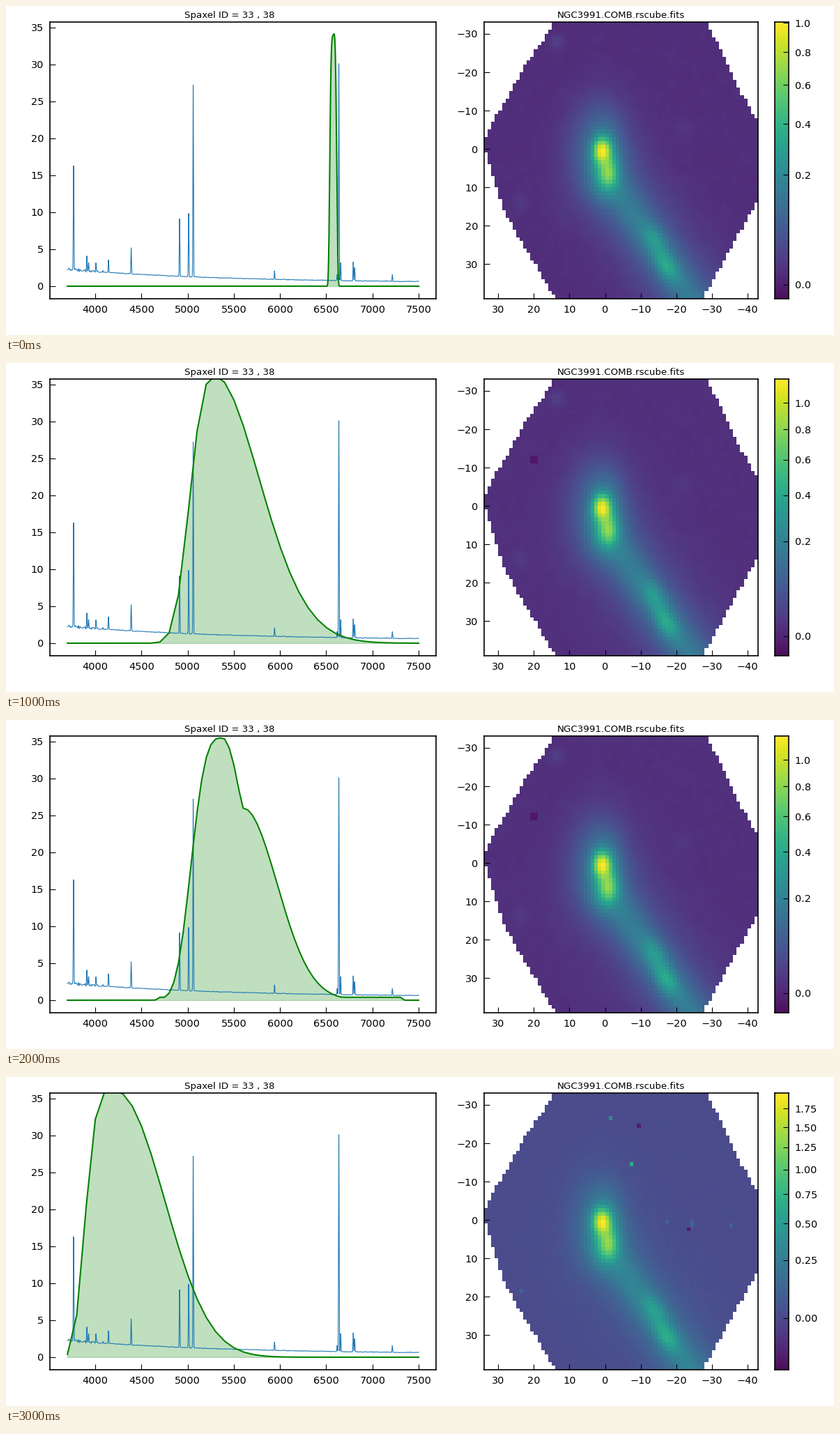
Write a matplotlib script that moves like this. It is 1188x472 px and loops after 3.5 s.

```python
import numpy as np
import matplotlib.pyplot as plt
from matplotlib.animation import FuncAnimation

W, H, DPI = 1188, 472, 80
plt.rcParams.update({
    "font.family": "DejaVu Sans",
    "axes.linewidth": 1.5,
    "xtick.direction": "in", "ytick.direction": "in",
    "xtick.major.size": 7, "ytick.major.size": 7,
    "xtick.major.width": 1, "ytick.major.width": 1,
    "xtick.major.pad": 8, "ytick.major.pad": 8,
    "xtick.labelsize": 13, "ytick.labelsize": 13,
})
fig = plt.figure(figsize=(W / DPI, H / DPI), dpi=DPI, facecolor="white")


def add_axes(x0, x1, y0=23.4, y1=420):
    """Axes from pixel edges measured from the top left."""
    return fig.add_axes([x0 / W, 1 - y1 / H, (x1 - x0) / W, (y1 - y0) / H])


def title(x, text):
    fig.text(x / W, 1 - 16.8 / H, text, size=12, ha="center", va="baseline")


# ---- spectrum ----
wave = np.arange(3700, 7501, 1.0)
LINES = {  # wavelength: peak height
    3766: 16.4, 3910: 4.1, 3929: 3.3, 4008: 3.2, 4144: 3.55, 4389: 5.2,
    4913: 9.1, 5011: 9.8, 5060: 27.2, 5940: 2.05, 6618: 1.6, 6636: 30.1,
    6656: 3.2, 6792: 3.3, 6807: 2.55, 7215: 1.55,
}


def spectrum():
    rng = np.random.default_rng(4)
    base = 0.45 + 1.85 * np.exp((3700 - wave) / 1650)
    knots = np.arange(3700, 7501, 8)
    rough = np.where(knots < 4100, 0.1, 0.025) * rng.normal(size=knots.size)
    flux = base + np.interp(wave, knots, rough)
    for centre, peak in LINES.items():
        height = peak - np.interp(centre, wave, base)
        flux += height * np.exp(-0.5 * ((wave - centre) / 3) ** 2)
    return flux


# ---- filter curves ----
def bell(peak, centre, left, right, left_pow=2.0, right_pow=2.0):
    """Peak with its own width and steepness on each side."""
    d = wave - centre
    side = np.where(d < 0, left, right)
    power = np.where(d < 0, left_pow, right_pow)
    return peak * np.exp(-np.abs(d / side) ** power)


def sampled(y, step):
    """Straight lines between samples of the curve."""
    return np.interp(wave, wave[::step], y[::step])


narrow = bell(34, 6575, 41, 41, 4, 4) * (1 + 0.0007 * (wave - 6575))
blue_wide = bell(25, 4380, 590, 548, 3.5, 2.6) + bell(0.8, 5600, 200, 140)
green_steep = sampled(bell(36.2, 5300, 331, 693, 2.85, 1.9), 100)
green_round = sampled(bell(31.6, 5250, 308, 825, 4.7, 2.5), 50)
hump = np.maximum(bell(35.5, 5375, 385, 380, 3.2, 2), bell(26, 5600, 100, 520))
pedestal = 0.4 * ((wave >= 4700) & (wave <= 7300))
green_bumpy = sampled(np.maximum(hump, pedestal), 50)
blue_flat = bell(13.05, 5120, 2053, 229, 1.52, 3.8) / (1 + np.exp((3985 - wave) / 75))
blue_steep = sampled(bell(36.1, 4200, 343, 742, 4, 2.15), 100)

# ---- galaxy map ----
COLS, ROWS = 77, 72
gx, gy = np.meshgrid(33.5 - np.arange(COLS), -32.5 + np.arange(ROWS))
TAIL = np.arctan2(-25, 34)


def blob(x, y, sx, sy, amp, angle=0.0):
    c, s = np.cos(angle), np.sin(angle)
    u, v = c * (gx - x) - s * (gy - y), s * (gx - x) + c * (gy - y)
    return amp * np.exp(-0.5 * ((u / sx) ** 2 + (v / sy) ** 2))


def ridge(width, amp):
    """Soft band along the tail."""
    dx, dy = np.sin(TAIL), np.cos(TAIL)
    px, py = gx + 2, gy - 9
    t = np.clip(px * dx + py * dy, 0, None)
    return amp * np.exp(-0.5 * ((px - t * dx) ** 2 + (py - t * dy) ** 2) / width ** 2)


galaxy = (blob(0.8, 0.5, 1.5, 2, 0.7) + blob(-0.9, 6.3, 1.6, 2.5, 0.38)
          + blob(0.3, 3, 2.6, 5, 0.2) + blob(1.5, 0, 5, 7.5, 0.09)
          + ridge(3, 0.08) + ridge(5.5, 0.05) + ridge(10, 0.01)
          + blob(-13.8, 23.5, 1.8, 3, 0.13, TAIL) + blob(-17.2, 30.3, 1.6, 3, 0.2, TAIL))
galaxy /= galaxy.max()
patches = (blob(13.6, -27.9, 1.3, 1.3, 0.016) + blob(23.8, 13.5, 1.4, 1.8, 0.009)
           + blob(-22, -5.5, 1.5, 1.5, 0.007))

noise = np.random.default_rng(7).normal(size=(ROWS, COLS))
soft = sum(np.roll(noise, (a, b), (0, 1)) for a in (-1, 0, 1) for b in (-1, 0, 1)) / 3

# hexagon cut into cells, from edge points in pixels
row_y = 24 + 5.5 * (np.arange(ROWS) + 0.5)
left = np.interp(row_y, [24, 83, 183, 204, 300, 419], [787, 747, 690, 686, 717, 787])
right = np.interp(row_y, [24, 100, 168, 278, 419], [1006, 1042, 1079, 1079, 1000])
first, last = (np.round((e - 686) / 5.104)[:, None] for e in (left, right))
col = np.arange(COLS)[None, :]
outside = (col < first) | (col >= last)

# faulty cells: (column, row, colour level)
BAD = [(41, 18, 0.6), (35, 6, 0.45), (43, 8, 0.04), (57, 35, 0.04)]
FAINT = [(51, 33), (58, 33), (58, 34), (69, 34), (10, 51)]

# curve, lowest and highest map value, tick step
FILTERS = [
    (narrow, -0.0026, 1.005, 0.2),
    (blue_wide, -0.1127, 1.975, 0.25),
    (green_steep, -0.0062, 1.198, 0.2),
    (green_round, -0.0066, 1.224, 0.2),
    (green_bumpy, -0.0062, 1.195, 0.2),
    (blue_flat, -0.0468, 1.801, 0.25),
    (blue_steep, -0.0713, 1.970, 0.25),
]


def level_map(i):
    """Colour levels (0 to 1, square-root scale) of the map."""
    curve_y, low, high, step = FILTERS[i]
    blue = step == 0.25
    value = galaxy * high + 0.007
    if blue:
        value = value + (0.002 + 0.02 * galaxy) * noise
    else:
        value = value + patches + 0.0007 * soft
    level = np.sqrt(np.clip((value - low) / (high - low), 0, 1))
    if blue:
        for c, r in FAINT:
            level[r, c] += 0.09
        for c, r, v in BAD:
            level[r, c] = v
    elif i > 0:
        level[20:22, 13:15] = 0.03
    return np.ma.array(level, mask=outside)


# ---- scene ----
LOOK = dict(aspect="auto", cmap="viridis", vmin=0, vmax=1,
            interpolation="nearest", alpha=0.95)

spec = add_axes(63, 617.3)
spec.set(xlim=(3510, 7690), ylim=(-1.7, 35.7),
         xticks=range(4000, 7501, 500), yticks=range(0, 36, 5))
spec.plot(wave, spectrum(), color="#1f77b4", lw=1)
curve, = spec.plot([], [], color="green", lw=1.8)
title(320.5, "Spaxel ID = 33 , 38")

sky = add_axes(686, 1079)
image = sky.imshow(level_map(0), extent=(34, -43, 39, -33), **LOOK)
sky.set(xticks=range(30, -41, -10), yticks=range(-30, 31, 10))
title(882, "NGC3991.COMB.rscube.fits")

bar = add_axes(1103, 1123)
bar.imshow(np.linspace(0, 1, 256)[:, None], extent=(0, 1, 0, 1), origin="lower", **LOOK)
bar.set_xticks([])
bar.yaxis.tick_right()

fills = []


def draw(i):
    y, low, high, step = FILTERS[i]
    while fills:
        fills.pop().remove()
    fills.append(spec.fill_between(wave, y, 0, color="green", alpha=0.25, lw=1))
    curve.set_data(wave, y)
    image.set_data(level_map(i))
    ticks = np.arange(0, high, step)
    digits = 1 if step == 0.2 else 2
    bar.set_yticks(np.sqrt((ticks - low) / (high - low)),
                   [f"{t:.{digits}f}" for t in ticks])
    return []


anim = FuncAnimation(fig, draw, frames=len(FILTERS), init_func=lambda: draw(0),
                     interval=500, repeat=True, repeat_delay=0, blit=False)
plt.show()
```
